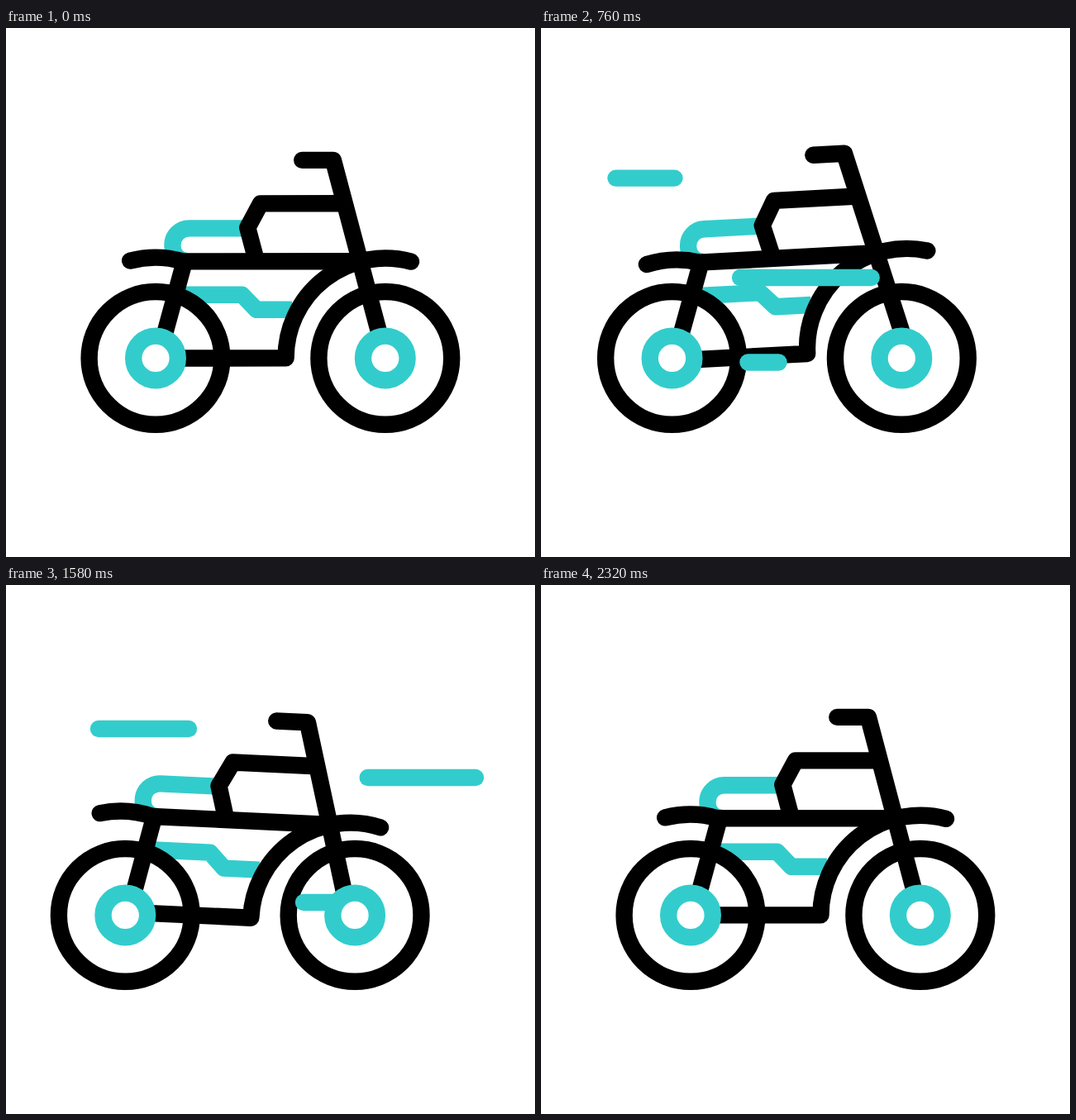
An HTML page for the animation above (2420 ms loop, 640x640 px).

```html
<!DOCTYPE html>
<html lang="en">
<head>
<meta charset="utf-8">
<title>Riding bike</title>
<style>
html, body { margin: 0; width: 100%; height: 100%; overflow: hidden; background: #fff; }
svg { display: block; width: 100vw; height: 100vh; }
.ink, .teal { fill: none; stroke: #000; stroke-width: 20.4; stroke-linejoin: round; }
.teal { stroke: #3cc; }
.cap { stroke-linecap: round; }
.hub { fill: #fff; }
</style>
</head>
<body>
<svg viewBox="0 0 640 640" xmlns="http://www.w3.org/2000/svg">
  <g id="body">
    <path class="teal" d="M292 242.3H221.5A20 20 0 0 0 201.5 262.3V264A18 18 0 0 0 219.5 282"/>
    <path class="teal" d="M207 322.7H285.5L303 340.8H346"/>
    <path class="ink cap" d="M358.3 159.9H396L455 383"/>
    <path class="ink" d="M409 212.4H308L292.3 241.6L302 278"/>
    <path class="ink cap" d="M150.2 281.4A122 122 0 0 1 214 282.3H428"/>
    <path class="ink cap" d="M206 399.4H338.5A120.4 120.4 0 0 1 490 282.8"/>
  </g>
  <path id="strut" class="ink"/>
  <g id="wheels">
    <circle class="ink" cx="181" cy="399.4" r="80.4"/>
    <circle class="ink" cx="458.8" cy="399.4" r="80.4"/>
    <circle class="teal hub" cx="181" cy="399.4" r="26.8"/>
    <circle class="teal hub" cx="458.8" cy="399.4" r="26.8"/>
  </g>
  <g id="wind" class="teal cap">
    <path data-start="242" d="M258.5 181.6h-168"/>
    <path data-start="381" d="M420.5 302h-200"/>
    <path data-start="630" d="M287.5 404.5h-200"/>
    <path data-start="996" d="M560 384h-200"/>
    <path data-start="1098" d="M307 174h-195"/>
    <path data-start="1295" d="M568 233h-200"/>
  </g>
</svg>
<script>
const LOOP = 2420;
const LEAD = 473, DELAY = 300, TRAIL = 395;
const PIVOT = { x: 320, y: 282 };
const $ = id => document.getElementById(id);
const body = $('body'), strut = $('strut'), wheels = $('wheels');
const gusts = [...$('wind').children];

const ease = (t, start, span) => {
  const u = Math.min(1, Math.max(0, (t - start) / span));
  return u * u * (3 - 2 * u);
};

// Swings from rest through each peak and back, one peak per step.
const swing = (start, step, ...peaks) => t =>
  [...peaks, 0].reduce((v, peak, i) =>
    v + (peak - (peaks[i - 1] || 0)) * ease(t, start + i * step, step), 0);

const shift = swing(40, 530, -45.5, 33, -38.5);
const bob = swing(20, 460, 11.4, -12.4, 8.5, -8.8);
const tilt = swing(-60, 770, -3.1, 2.8);

function drawBike(t) {
  const x = shift(t), y = bob(t), deg = tilt(t), rad = deg * Math.PI / 180;
  wheels.setAttribute('transform', `translate(${x} 0)`);
  body.setAttribute('transform',
    `translate(${x} ${y}) rotate(${deg} ${PIVOT.x} ${PIVOT.y})`);
  // The rear strut joins the tilting frame to the hub.
  const arm = -104;
  const top = [PIVOT.x + x + arm * Math.cos(rad), PIVOT.y + y + arm * Math.sin(rad)];
  strut.setAttribute('d', `M${top}L${184 + x} 399.4`);
}

function drawGust(path, t) {
  const age = t - path.dataset.start;
  const head = ease(age, 0, LEAD), tail = ease(age, DELAY, TRAIL);
  const len = path.getTotalLength();
  path.style.display = head > tail ? '' : 'none';
  path.style.strokeDasharray = `${(head - tail) * len} ${2 * len}`;
  path.style.strokeDashoffset = -tail * len;
}

function draw(t) {
  drawBike(t);
  gusts.forEach(path => drawGust(path, t));
}

let origin = null;
function tick(now) {
  if (origin === null) origin = now;
  draw((now - origin) % LOOP);
  requestAnimationFrame(tick);
}
draw(0);
requestAnimationFrame(tick);
</script>
</body>
</html>
```
